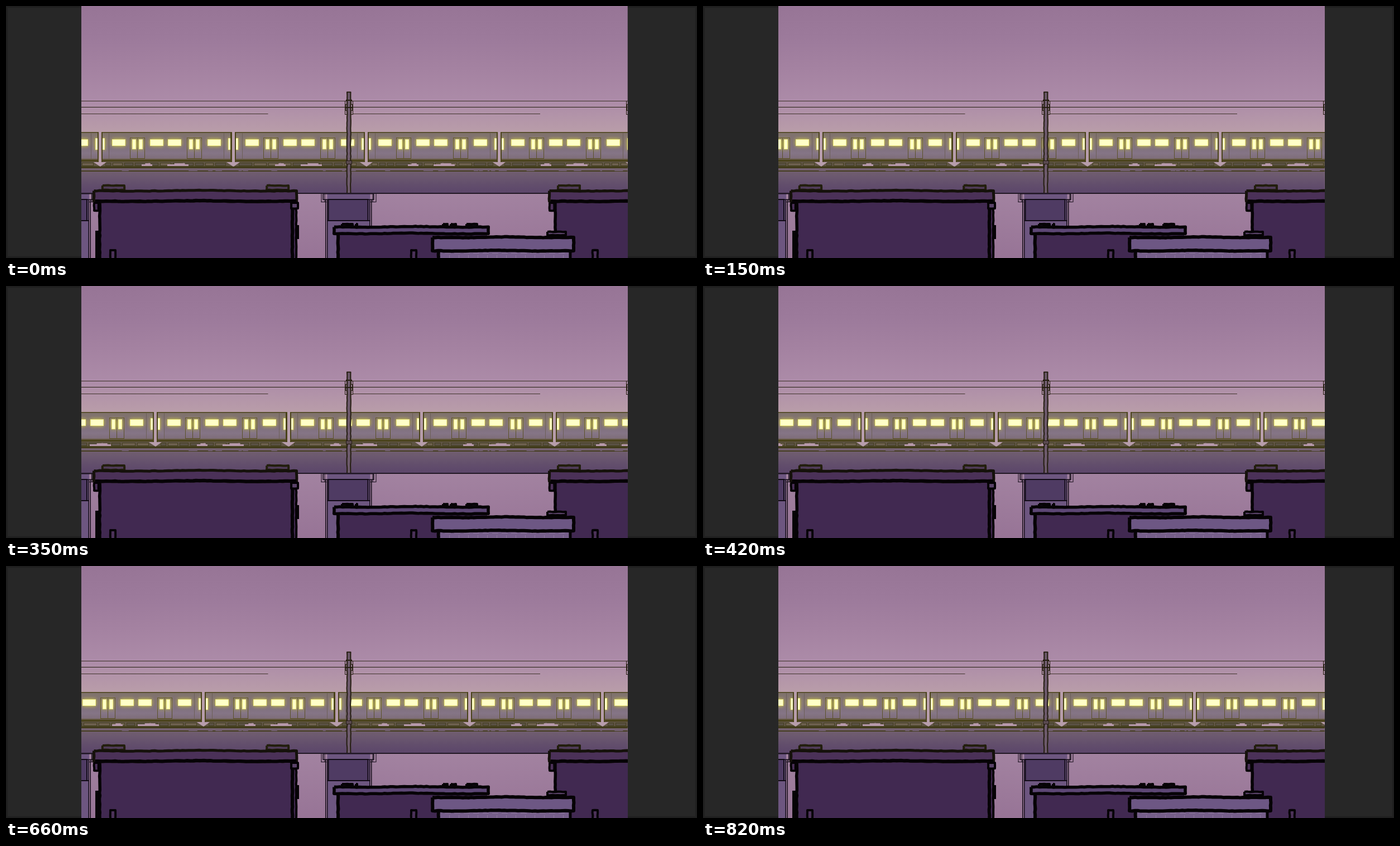
Recreate the animation shown at these times as an HTML page with a canvas. Size 1238 by 452 pixels, loop 0.86 s.

```html
<!DOCTYPE html>
<html lang="en">
<head>
<meta charset="utf-8">
<title>Evening train</title>
<style>
html, body { margin: 0; width: 100%; height: 100%; overflow: hidden; background: #272727; }
canvas { display: block; width: 100vw; height: 100vh; }
</style>
</head>
<body>
<canvas id="stage" width="1238" height="452"></canvas>
<script>
const W = 1238, H = 452, LEFT = 134.5, RIGHT = 1113.5, SPAN = RIGHT - LEFT;
const LOOP = 860, PITCH = 238.2, FIRST_GAP = 168, PAD = 20;
const BLACK = '#060306', OLIVE = '#4a431a', INK = '#241d10', SEAM = '#120b17';
const WALL = '#412951', SLAB = '#4b3158', TRIM = '#5a4369', STONE = '#6d5784';

// The train cruises, then gains a little speed: [ms, px].
const TRAVEL = [[0, 0], [150, 43], [660, 185.5], [820, 235], [LOOP, PITCH]];

let seed = 7;
const rnd = () => (seed = (seed * 16807) % 2147483647) / 2147483647;

let g;
function layer(w, paint) {
  const c = document.createElement('canvas');
  c.width = w;
  c.height = H;
  g = c.getContext('2d');
  paint();
  return c;
}

function box(x, y, w, h, fill) {
  g.fillStyle = fill;
  g.fillRect(x, y, w, h);
}

function frame(x, y, w, h, color, lw = 1) {
  g.strokeStyle = color;
  g.lineWidth = lw;
  g.strokeRect(x + lw / 2, y + lw / 2, w - lw, h - lw);
}

// Vertical gradient with evenly spaced colours.
function fade(y1, y2, ...colors) {
  const f = g.createLinearGradient(0, y1, 0, y2);
  colors.forEach((c, i) => f.addColorStop(i / (colors.length - 1), c));
  return f;
}

// Hand-drawn outline: long edges sag gently and tremble a little.
function rough(points, lw, color = BLACK, fill) {
  g.beginPath();
  points.forEach(([x, y], i) => {
    if (!i) return g.moveTo(x, y);
    const [px, py] = points[i - 1];
    const n = Math.max(1, Math.round(Math.hypot(x - px, y - py) / 5));
    for (let k = 1; k <= n; k++) {
      const u = k / n, j = k < n ? 0.9 : 0;
      const sag = Math.abs(x - px) > 100 ? 0.8 * Math.sin(u * 9) * Math.sin(u * Math.PI) : 0;
      g.lineTo(px + (x - px) * u + (rnd() - 0.5) * j, py + (y - py) * u + sag + (rnd() - 0.5) * j);
    }
  });
  if (fill) { g.fillStyle = fill; g.fill(); }
  g.strokeStyle = color;
  g.lineWidth = lw;
  g.lineJoin = 'round';
  g.stroke();
}

const post = (x, y, lw) => rough([[x, y], [x, H]], lw);

// Outer bounds of a filled block with a rough border.
function block(x, y, w, h, lw, fill, color) {
  const a = x + lw / 2, b = y + lw / 2, c = x + w - lw / 2, d = y + h - lw / 2;
  rough([[a, b], [c, b], [c, d], [a, d], [a, b]], lw, color, fill);
}

function paintBack() {
  box(LEFT, 0, SPAN, 226, fade(0, 226, '#977596', '#9c7a9b', '#a482a1', '#ac8ba8', '#b99da9'));
  box(LEFT, 226, SPAN, H - 226, fade(226, H, '#b99da9', '#a282a0', '#974f96'.replace('4f', '74')));
  box(LEFT, 170, SPAN, 1, '#3b3026');
  box(LEFT, 181, SPAN, 1, INK);
  for (const x of [LEFT, 622]) box(x, 193, 335, 1, '#40342c');
}

function lit(x, y, w, h) {
  g.save();
  g.shadowColor = 'rgba(222,222,60,0.9)';
  g.shadowBlur = 7;
  box(x, y, w, h, '#f3ee84');
  g.restore();
  box(x + 1, y + 1, w - 2, h - 2, '#ffffc8');
}

function paintDoor(x) {
  frame(x, 236, 27, 38, '#5b5129');
  box(x + 13, 237, 1, 36, '#5b5129');
  for (const dx of [4, 16]) lit(x + dx, 239, 7, 18);
}

// One carriage; x is the middle of the gap ahead of it.
function paintCar(x) {
  box(x + 2, 226, 235, 51, fade(226, 277, '#80736a', '#807072', '#7e6e7b', '#857586', '#7c6b74'));
  frame(x + 2, 226, 235, 51, OLIVE, 1.5);
  for (const dx of [16, 222]) box(x + dx, 228, 1, 47, '#6d6058');
  for (const dx of [22, 90, 122, 193]) lit(x + dx, 239, 24, 12);
  for (const dx of [54, 156]) paintDoor(x + dx);
  for (const dx of [4, 230]) lit(x + dx, 237, 5, 21);
  paintUnderside(x);
  for (const end of [x, x + PITCH]) paintGap(Math.round(end));
}

function paintUnderside(x) {
  const gap = '#b799ab';
  box(x, 277, 239, 13, '#5f5444');
  box(x, 274, 239, 1, '#695c3f');
  box(x, 276, 239, 3, OLIVE);
  for (let dx = 10; dx < 222;) {
    const w = 10 + Math.floor(rnd() * 16);
    box(x + dx, 281, w, 6, rnd() < 0.5 ? '#595043' : '#6d604f');
    frame(x + dx, 281, w, 6, '#454021');
    dx += w + 3;
  }
  for (const [dx, w] of [[75, 19], [121, 38]]) {
    box(x + dx, 284, w, 3, gap);
    box(x + dx + w / 3, 282, w / 2, 2, gap);
  }
  box(x, 287, 239, 2, '#454021');
}

function paintGap(x) {
  const light = '#b79dab';
  box(x - 4, 226, 9, 54, OLIVE);
  box(x - 2, 226, 5, 54, light);
  g.fillStyle = light;
  g.beginPath();
  g.moveTo(x - 11, 280);
  g.lineTo(x + 12, 280);
  g.lineTo(x + 1, 288);
  g.fill();
}

function paintTrain() {
  for (let i = 0; i < 7; i++) paintCar(Math.round(i * PITCH) + PAD);
}

function paintViaduct() {
  box(LEFT, 289, SPAN, 47, fade(289, 336, '#76636f', '#6c596f', '#624e6c', '#5c466a'));
  box(LEFT, 289, SPAN, 2, '#3e3818');
  box(LEFT, 295, SPAN, 2, '#453d20');
  box(LEFT, 335, SPAN, 2, '#211825');
  for (let i = 0; i < 28; i++) box(LEFT + rnd() * 970, 295, 3 + rnd() * 12, 1, '#75627a');
}

function paintPole() {
  for (const x of [607, 1111]) {
    frame(x, 170, 15, 25, INK);
    frame(x + 1, 176, 13, 12, INK);
  }
  rough([[611, 335], [611, 154.5], [617.5, 154.5], [617.5, 335]], 2, INK, '#6d5a6c');
  for (const y of [168, 181]) box(609, y, 11, 2, INK);
  box(609, 277, 11, 7, '#59494f');
  frame(609, 277, 11, 7, INK);
}

// Mirrored about its middle x.
function paintPier(x) {
  box(x - 38, 336, 77, H - 336, '#6d5680');
  frame(x - 46, 336, 92, 12, SEAM, 1.5);
  for (const side of [-1, 1]) {
    for (const d of [43, 49]) box(x + side * d, 337, 1, 15, SEAM);
    for (const d of [38, 41]) box(x + side * d - 0.5, 347, 1.5, 105, SEAM);
    box(x + side * 44 - 5, 351, 10, 1, SEAM);
  }
  box(x - 36, 347, 71, 39, '#4f3b63');
  frame(x - 37, 346, 73, 40, SEAM, 2);
  box(x - 38, 384, 77, 2, SEAM);
}

function paintVent(x) {
  rough([[x + 2, H], [x + 2, 438], [x + 11, 438], [x + 11, H]], 4, BLACK, SLAB);
}

function paintTower(x, vent) {
  box(x + 10, 350, 353, 102, WALL);
  for (const dx of [15, 309]) block(x + dx, 320, 43, 12, 4, '#4f3b58', '#221e0d');
  block(x - 1, 329, 368, 24, 5, SLAB, '#15110b');
  rough([[x + 4, 350], [x + 364, 350]], 6);
  post(x + 12, 352, 5.5);
  post(x + 357, 352, 6);
  post(x + 364, 360, 4);
  block(x, 351, 12, 18, 4, SLAB);
  block(x + 353, 351, 16, 14, 4, TRIM);
  box(x + 4, 403, 6, 49, BLACK);
  box(x + 365, 393, 4, 25, BLACK);
  paintVent(x + vent);
}

function paintLowBlock() {
  box(592, 408, 270, 44, WALL);
  for (const [x, w] of [[600, 23], [625, 6], [781, 12], [795, 13], [823, 23]]) {
    block(x, 389, w, 8, 4, SLAB);
  }
  block(585, 393.5, 282, 17.5, 5.5, '#5d4775');
  post(595, 410, 6);
  paintVent(724);
}

function paintFrontBlock() {
  box(776, 438, 236, 14, '#765f8a');
  for (let x = 786; x < 1004; x += 17) {
    box(x, 443, 11, 1, '#8b759b');
    box(x + 8, 447, 1, 5, '#8b759b');
  }
  block(968, 403, 37, 10, 4, TRIM);
  block(761, 412, 259, 30, 6, STONE);
  post(775, 440, 6);
  post(1011, 440, 5);
}

function paintFront() {
  paintPier(613.5);
  paintPier(110);
  paintViaduct();
  paintPole();
  paintTower(156, 29);
  paintTower(972, 77);
  paintLowBlock();
  paintFrontBlock();
}

function paintSides() {
  box(0, 0, W, H, '#272727');
  for (let i = 0; i < 4; i++) frame(i, i, W - 2 * i, H - 2 * i, `rgba(12,12,12,${0.3 - i * 0.07})`);
  g.clearRect(LEFT, 0, SPAN, H);
}

const back = layer(W, paintBack);
const train = layer(1720, paintTrain);
const front = layer(W, paintFront);
const sides = layer(W, paintSides);
const stage = document.getElementById('stage').getContext('2d');

function travelAt(t) {
  const i = TRAVEL.findIndex(([end]) => end > t);
  const [t0, x0] = TRAVEL[i - 1], [t1, x1] = TRAVEL[i];
  return x0 + (x1 - x0) * (t - t0) / (t1 - t0);
}

function draw(now) {
  const x = Math.round(FIRST_GAP - 2 * PITCH + travelAt(now % LOOP)) - PAD;
  stage.drawImage(back, 0, 0);
  stage.drawImage(train, x, 0);
  stage.drawImage(front, 0, 0);
  stage.drawImage(sides, 0, 0);
}

const start = performance.now();
function loop() {
  draw(Math.max(0, performance.now() - start));
  requestAnimationFrame(loop);
}
loop();
</script>
</body>
</html>
```
